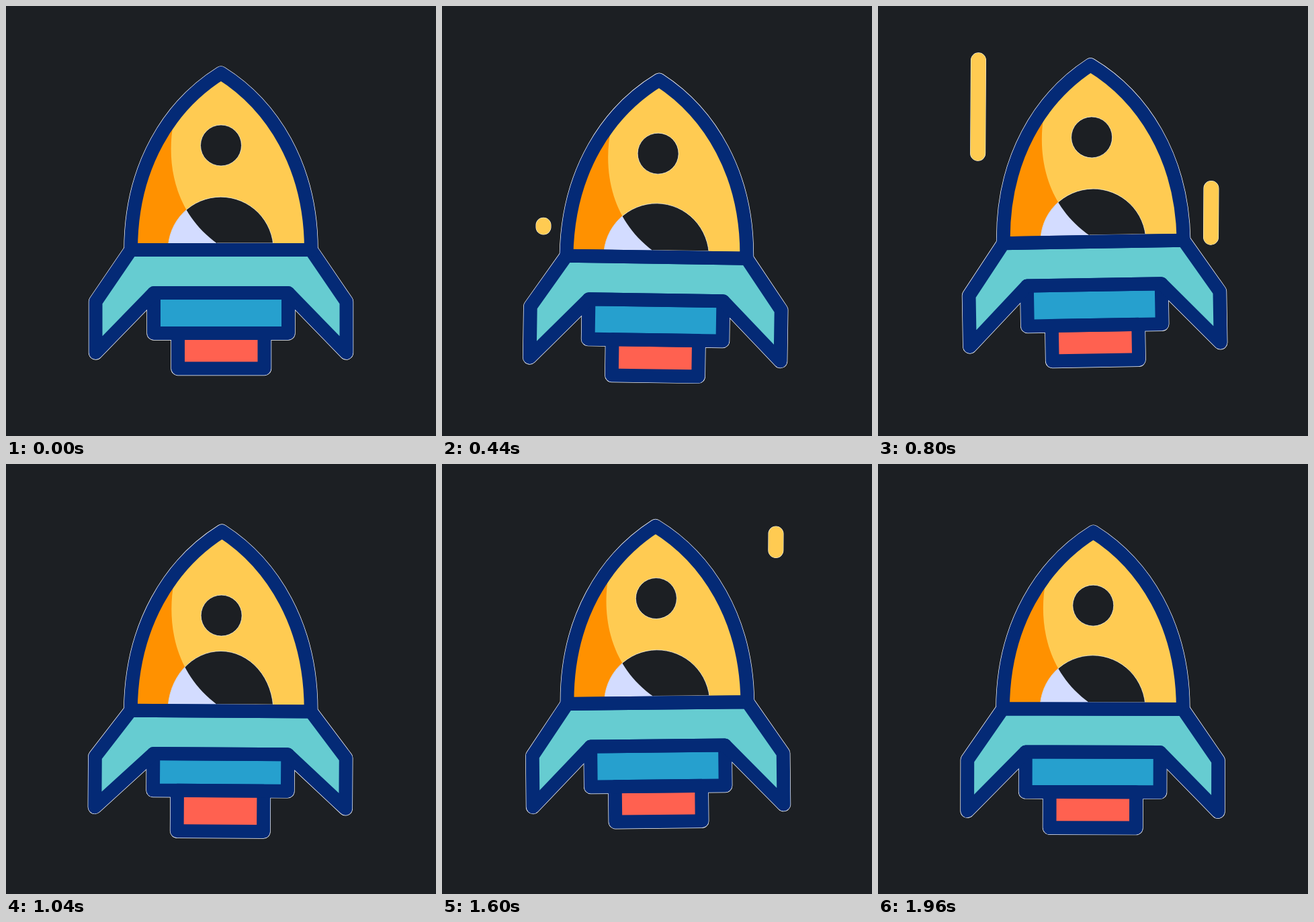
Recreate the animation shown at these times as an HTML page. Size 640x640 px, loop 2000 ms.

```html
<!DOCTYPE html>
<html lang="en">
<head>
<meta charset="utf-8">
<title>Rocket</title>
<style>
  html, body { margin: 0; width: 100%; height: 100%; overflow: hidden; background: #1c1f23; }
  svg { display: block; width: 100vw; height: 100vh; }
  .line { fill: none; stroke: #042a76; stroke-width: 20; stroke-linejoin: round; stroke-linecap: round; }
  .edge { fill: none; stroke: #fff; stroke-width: 21.4; stroke-linejoin: round; }
  .hole { fill: #1c1f23; stroke: #fff; stroke-opacity: .75; stroke-width: .9; }
  .streak { fill: none; stroke: #ffcb52; stroke-width: 22; stroke-linecap: round; }
  .streak.rim { stroke: #fff; stroke-width: 23; }
</style>
</head>
<body>
<svg viewBox="0 0 640 640">
  <defs>
    <clipPath id="bodyClip"><path data-d="body"/></clipPath>
    <clipPath id="shadeClip"><path data-d="shade"/></clipPath>
  </defs>
  <path class="left streak rim"/><path class="left streak"/>
  <path class="right streak rim"/><path class="right streak"/>
  <g id="rocket">
    <g class="edge">
      <path data-d="body"/><path data-d="fins"/><path data-d="tank"/><path data-d="nozzle"/>
    </g>
    <g clip-path="url(#bodyClip)">
      <path data-d="body" fill="#ffcb52"/>
      <path data-d="shade" fill="#ff9100"/>
      <ellipse class="dome hole" cx="319.7" cy="363" rx="78.5"/>
      <path class="hole" d="M314 352.9H397"/>
      <ellipse class="dome" cx="319.7" cy="363" rx="78.5" fill="#d3dcff" clip-path="url(#shadeClip)"/>
      <circle id="porthole" class="hole" cx="320" r="30.5"/>
    </g>
    <path data-d="nozzle" fill="#ff6150"/>
    <path data-d="tank" fill="#26a0ce"/>
    <path data-d="fins" fill="#66ccd1"/>
    <g class="line">
      <path data-d="nozzle"/><path data-d="tank"/><path data-d="fins"/><path data-d="body"/>
    </g>
  </g>
</svg>
<script>
const LOOP = 2000, STEP = 40, CYCLE = 480;
const $ = id => document.getElementById(id);
const all = selector => [...document.querySelectorAll(selector)];
const parts = all('[data-d]'), domes = all('.dome');
const left = all('.left'), right = all('.right');

const ease = p => (1 - Math.cos(Math.PI * Math.min(1, Math.max(0, p)))) / 2;

// Vertical bob from -1 (up) to 1 (down), resting at both ends of the loop.
function bob(t) {
  const quarter = LOOP / 12;
  if (t < quarter) return -ease(t / quarter);
  if (t > LOOP - quarter) return ease((LOOP - t) / quarter);
  return -Math.sin(6 * Math.PI * t / LOOP);
}

// Outlines for a stretch s from 0 to 1.
function outlines(s) {
  const y = v => 363 - (363 - v) * (1 + 0.019 * s);
  const corner = 440 - 9 * s, tip = 516 - 10 * s;
  const tankEnd = 487 - 6 * s, nozzleEnd = 539.5 + 2.7 * s;
  return {
    body: `M186 363C186 ${y(237)} 245 ${y(147)} 320 ${y(100)}C395 ${y(147)} 454 ${y(237)} 454 363Z`,
    shade: `M249 ${y(175)}C240 ${y(225)} 245 ${y(304)} 315 354L324 364H150V150Z`,
    fins: `M186 363H454L506.5 ${corner}V${tip}L420 427H220L133.5 ${tip}V${corner}Z`,
    tank: `M220 427H420V${tankEnd}H220Z`,
    nozzle: `M256 ${tankEnd}H384.5V${nozzleEnd}H256Z`
  };
}

// A line whose head runs down the path and whose tail follows 60 ms later.
function streak(els, t, { x, top, bottom, start, span }) {
  const head = ease((t - start) / span), tail = ease((t - start - 60) / span);
  const at = p => `${x - 1.6 * p} ${top + (bottom - top) * p}`;
  const d = head - tail > 0.002 ? `M${at(tail)}L${at(head)}` : '';
  for (const el of els) el.setAttribute('d', d);
}

function draw(t) {
  const b = bob(t), s = (1 - Math.cos(Math.PI * t / 200)) / 2;
  const d = outlines(s);
  for (const p of parts) p.setAttribute('d', d[p.dataset.d]);
  for (const e of domes) e.setAttribute('ry', 78.8 + 11.5 * s);
  $('porthole').setAttribute('cy', 207.5 + 14.8 * s);
  $('rocket').setAttribute('transform', `translate(0 ${12.7 * b}) rotate(${b} 320 320)`);

  // The first pass on the left starts lower and a little to the right.
  const first = t < CYCLE, c = t % CYCLE;
  streak(left, c, { x: first ? 152.6 : 149.6, top: first ? 84 : 57, bottom: 329, start: 229, span: 162 });
  streak(right, c, { x: 497, top: 104, bottom: 360, start: 110, span: 250 });
}

function tick() {
  draw(Math.floor(performance.now() % LOOP / STEP) * STEP);
  requestAnimationFrame(tick);
}
tick();
</script>
</body>
</html>
```
